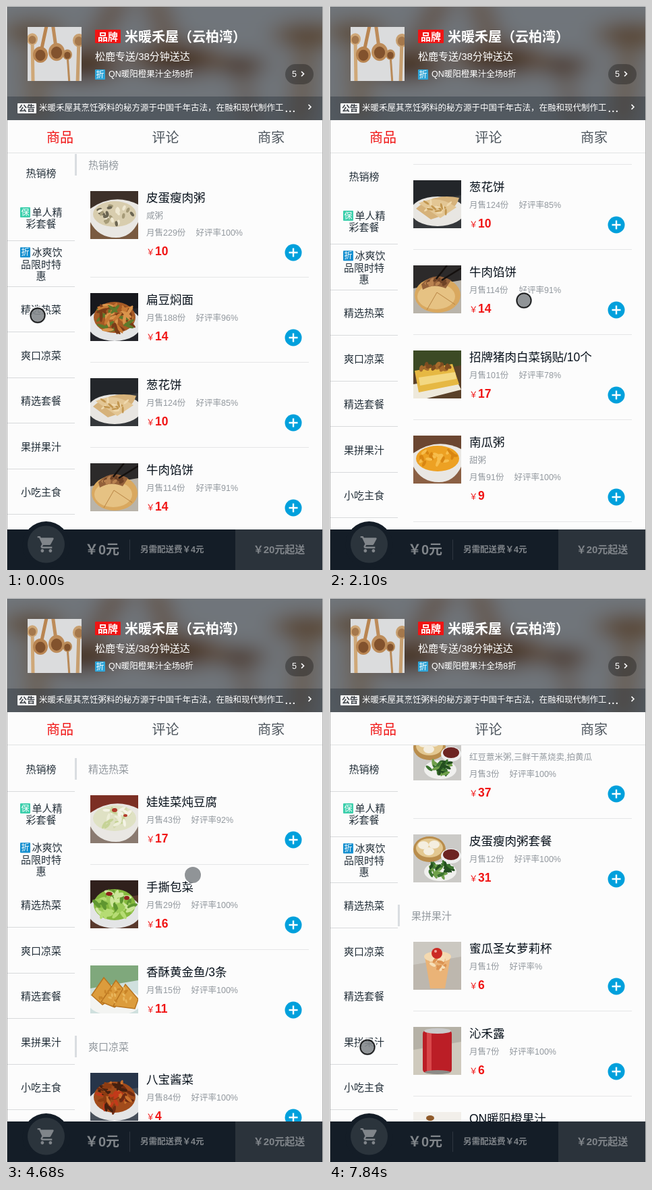
These frames come from a looping animation (470x835 px, 7990 ms). An HTML page:

```html
<!DOCTYPE html>
<html lang="zh">
<head>
<meta charset="utf-8">
<style>
html, body { margin: 0; width: 100%; height: 100%; overflow: hidden; background: #fcfcfc; }
svg { display: block; }
text { font-family: "Liberation Sans", "Noto Sans CJK SC", "Noto Sans CJK", sans-serif; white-space: pre; }
</style>
</head>
<body>
<svg id="stage" width="470" height="835" viewBox="0 0 470 835"></svg>
<script>
const RED = '#f01414', GREY = '#93999f', INK = '#07111b', DIM = '#80858a';

const text = (x, y, size, fill, str, more = '') =>
  `<text x="${x}" y="${y}" font-size="${size}" fill="${fill}" ${more}>${str}</text>`;
const rect = (x, y, w, h, fill, more = '') =>
  `<rect x="${x}" y="${y}" width="${w}" height="${h}" fill="${fill}" ${more}/>`;
const oval = (x, y, rx, ry, fill, more = '') =>
  `<ellipse cx="${x}" cy="${y}" rx="${rx}" ry="${ry}" fill="${fill}" ${more}/>`;
const path = (d, fill, more = '') => `<path d="${d}" fill="${fill}" ${more}/>`;
const BOLD = 'font-weight="700"', MID = 'text-anchor="middle"';

// ---- food pictures, 71 x 71 ----
let seed = 7;
const rnd = () => (seed = seed * 16807 % 2147483647) / 2147483647;

function bits(cx, cy, rx, ry, colors, n, len = 6, thick = 2.2) {
  let s = '';
  for (let i = 0; i < n; i++) {
    const a = rnd() * 6.28, r = Math.sqrt(rnd());
    const x = cx + Math.cos(a) * r * rx, y = cy + Math.sin(a) * r * ry;
    s += oval(x.toFixed(1), y.toFixed(1), len, thick, colors[i % colors.length],
      `transform="rotate(${rnd() * 180 | 0} ${x.toFixed(1)} ${y.toFixed(1)})"`);
  }
  return s;
}
const ground = (back, table) => rect(0, 0, 71, 71, back) + path('M0 34L71 22V71H0z', table);
const bowl = (food, colors, n = 24, len = 4) =>
  path('M0 26Q35 2 71 20V46Q60 69 38 69Q12 69 0 46z', '#e9e7e3') +
  oval(36, 34, 32, 19, food) + bits(36, 34, 27, 15, colors, n, len);
const heap = (food, colors, n = 40, len = 7, thick = 2.4) =>
  oval(36, 46, 40, 25, '#e4e5e6') + oval(36, 36, 31, 23, food) + bits(36, 36, 27, 20, colors, n, len, thick);

const art = {
  congee: () => ground('#3d3029', '#7a5a40') + bowl('#d8cdae', ['#6b6552', '#efe8d2', '#a69b78']),
  noodle: () => ground('#17181d', '#24252b') +
    heap('#a65a25', ['#c87a35', '#7a3c18', '#5d7a2c', '#d9944c'], 46, 9),
  pancake: () => ground('#23262a', '#35383b') + oval(36, 46, 40, 22, '#e8e6e2') +
    path('M4 42Q30 18 68 26Q62 48 26 58z', '#d6b27a') + path('M8 34Q36 20 64 40L40 56z', '#e3c694') +
    bits(36, 39, 22, 10, ['#c2964f', '#efd9ae'], 16, 5, 1.5),
  pie: () => ground('#2c2a2a', '#b9b4aa') + oval(36, 44, 34, 26, '#d9a85f') + oval(34, 46, 28, 19, '#e6c283') +
    path('M12 28Q30 8 56 22L48 34Q30 26 14 36z', '#94613a') + bits(34, 25, 16, 4, ['#b98250', '#6e4226'], 12, 4) +
    path('M50 0L34 20M71 4L42 22', 'none', 'stroke="#14100e" stroke-width="2.5"') +
    path('M35 40L20 66M35 40L62 58', 'none', 'stroke="#b98544"'),
  dumpling: () => ground('#3c4a25', '#5a4129') + path('M0 50L62 40L71 58L20 71H0z', '#eee9db') +
    path('M2 30L58 20L68 50L8 62z', '#e6b843') + path('M8 40L62 32L64 42L10 52z', '#f3d883') +
    bits(33, 25, 24, 5, ['#7d4c20', '#a66b2c'], 16, 5, 3),
  pumpkin: () => ground('#6b4631', '#8b6044') + bowl('#eda123', ['#f7bd4c', '#d98612'], 22, 5),
  redbean: () => ground('#584034', '#82604a') + bowl('#8f4a3c', ['#6b2c25', '#c8a58a'], 24, 3),
  pickle: () => ground('#27354a', '#48505b') + heap('#a14b1b', ['#c9702c', '#6e2b12', '#c23a1a', '#8d3c12', '#45200f'], 50, 7),
  fan: () => ground('#2a2a2e', '#44413d') + oval(36, 48, 42, 26, '#dfe0df') +
    path('M2 24Q24 6 56 16L38 50L4 46z', '#d3c682') + path('M16 54L40 18Q72 34 66 58Q40 70 16 54z', '#ddd196') +
    bits(38, 38, 22, 16, ['#b9ad57', '#efe6b8'], 24, 3, 1.4) + oval(66, 48, 4, 3, '#cf3a26'),
  set: () => rect(0, 0, 71, 71, '#d2d0cc') + oval(22, 20, 24, 19, '#c8a052') + oval(22, 18, 19, 14, '#ecd9a2') +
    [[14, 14], [30, 13], [22, 23]].map(p => oval(...p, 8, 6, '#f4eee0')).join('') +
    oval(56, 24, 15, 11, '#f0eeea') + oval(56, 23, 11, 8, '#b96b32') +
    oval(58, 51, 15, 11, '#f0eeea') + oval(58, 50, 11, 8, '#a5552a') +
    oval(24, 53, 25, 16, '#eef0ea') + bits(24, 51, 18, 11, ['#a8cc6a', '#d3e3a3', '#c3dc8c'], 30, 6),
  set2: () => rect(0, 0, 71, 71, '#cbcac7') + oval(24, 22, 24, 19, '#b98d4c') + oval(24, 20, 20, 14, '#e3c891') +
    [[15, 16], [31, 15], [23, 25]].map(p => oval(...p, 8, 6, '#f4eee0')).join('') +
    oval(56, 32, 15, 11, '#eee') + oval(56, 30, 12, 8, '#6d2422') +
    oval(40, 55, 24, 14, '#f0f0ee') + bits(40, 52, 18, 10, ['#3c7430', '#6fa04a', '#244f20'], 30, 6),
  tofu: () => ground('#7c2f24', '#8a7a70') + bowl('#dfe1c4', ['#f4f3e6', '#c6d396', '#edeed8', '#d5dab0'], 26, 6) +
    oval(36, 22, 4, 3, '#b23a2a') + oval(52, 30, 3, 2, '#b23a2a'),
  cabbage: () => ground('#30201c', '#59392c') +
    heap('#86b93e', ['#b6dc74', '#5f9630', '#cde69a', '#9ccb58'], 40, 8, 3) +
    oval(28, 20, 5, 3, '#8f231c') + oval(54, 26, 4, 3, '#8f231c'),
  fish: () => ground('#7fa87c', '#cfe0de') + oval(36, 54, 40, 20, '#f3f4f2') +
    ['M2 44L20 18L42 44L18 58z', 'M16 54L38 22L58 46L36 62z', 'M34 60L52 28L71 50L66 64z']
      .map(d => path(d, '#dc9c3c', 'stroke="#b8741f" stroke-width="1.5"')).join('') +
    bits(38, 44, 26, 12, ['#e9b65c', '#c98428'], 20, 3, 1.5),
  cucumber: () => ground('#1c2420', '#2c302a') + heap('#4e7a2b', ['#86b04c', '#2f5a1e', '#a9c873', '#416c26'], 30, 10, 3.6),
  cup: () => ground('#cbc8c1', '#bdb7ae') + path('M17 22H55L47 69H25z', '#eab377') +
    oval(36, 22, 20, 8, '#f4d9b0') + bits(36, 32, 14, 9, ['#f6dfb8', '#dc9352'], 14, 5) +
    oval(35, 17, 8, 8, '#cb2a24') + oval(33, 14, 2, 2, '#f0a89c'),
  can: () => ground('#b5b1a6', '#cfcabd') + rect(14, 5, 43, 63, '#bb1e26', 'rx="5"') +
    rect(20, 8, 7, 58, '#d8474a') + oval(36, 6, 20, 4, '#c9c9c9') + oval(36, 67, 19, 3, '#8c8a86'),
  juice: () => rect(0, 0, 71, 71, '#f2efea') + path('M18 24H52L48 71H22z', '#eea53a') + oval(25, 9, 6, 4, '#8f5a2a')
};

// ---- menu data: [section, [name, sold, rating, price, picture, ...description lines]] ----
const juice = ['QN暖阳橙果汁', 15, 100, 8, 'juice'];
const pickles = ['八宝酱菜', 84, 100, 4, 'pickle'];
const sections = [
  ['热销榜', [
    ['皮蛋瘦肉粥', 229, 100, 10, 'congee', '咸粥'],
    ['扁豆焖面', 188, 96, 14, 'noodle'],
    ['葱花饼', 124, 85, 10, 'pancake'],
    ['牛肉馅饼', 114, 91, 14, 'pie'],
    ['招牌猪肉白菜锅贴/10个', 101, 78, 17, 'dumpling'],
    ['南瓜粥', 91, 100, 9, 'pumpkin', '甜粥'],
    ['红豆薏米美容粥', 86, 100, 12, 'redbean', '甜粥'],
    pickles,
    ['红枣山药糙米粥', 81, 91, 10, 'pickle'],
    ['糊塌子', 80, 93, 10, 'fan']]],
  ['单人精彩套餐', [
    ['红枣山药粥套餐', 17, 100, 29, 'set', '红枣山药糙米粥,素材包,爽口莴笋丝,四川泡', '菜或八宝酱菜,配菜可备注']]],
  ['冰爽饮品限时特惠', [juice]],
  ['精选热菜', [
    ['娃娃菜炖豆腐', 43, 92, 17, 'tofu'],
    ['手撕包菜', 29, 100, 16, 'cabbage'],
    ['香酥黄金鱼/3条', 15, 100, 11, 'fish']]],
  ['爽口凉菜', [pickles, ['拍黄瓜', 28, 100, 9, 'cucumber']]],
  ['精选套餐', [
    ['红豆薏米粥套餐', 3, 100, 37, 'set2', '红豆薏米粥,三鲜干蒸烧卖,拍黄瓜'],
    ['皮蛋瘦肉粥套餐', 12, 100, 31, 'set2']]],
  ['果拼果汁', [
    ['蜜瓜圣女萝莉杯', 1, '', 6, 'cup'],
    ['沁禾露', 7, 100, 6, 'can'],
    juice]],
  ['小吃主食', []]
];

const TOP = 218.5, tops = [];

function foodItem([name, sold, rate, price, pic, ...desc], y, last) {
  const extra = desc.length ? 10 + 15 * desc.length : 0;
  const rateX = 208 + 52.5 + 7 * String(sold).length;
  return `<g transform="translate(0 ${Math.round(TOP + y)})">` +
    `<svg x="125" width="71" height="71">${art[pic]()}</svg>` +
    text(208, 16, 17.5, INK, name) +
    desc.map((d, i) => text(208, 41 + 15 * i, 12.5, GREY, d)).join('') +
    text(208, 41 + extra, 12.5, GREY, `月售${sold}份`) +
    text(rateX, 41 + extra, 12.5, GREY, `好评率${rate}%`) +
    text(208, 70 + extra, 12.5, RED, '￥') + text(221, 70 + extra, 17.5, RED, price, BOLD) +
    oval(426, 66 + extra, 12.5, 12.5, '#00a0dc') +
    path(`M419.5 ${66 + extra}h13m-6.5 -6.5v13`, 'none', 'stroke="#fff" stroke-width="2.4"') +
    (last ? '' : rect(125, 102 + extra, 324, 1, '#e5e6e7')) + '</g>';
}

function foodList() {
  let y = 0, s = '';
  for (const [title, foods] of sections) {
    tops.push(y);
    const ty = Math.round(TOP + y);
    if (foods.length) s += rect(102, ty, 3, 32, '#d9dde1') + text(122, ty + 22, 15, GREY, title);
    y += 55.5;
    foods.forEach((f, i) => {
      const last = i == foods.length - 1, lines = f.length - 5;
      s += foodItem(f, y, last);
      y += (last ? 103.5 : 126) + (lines ? 10 + 15 * lines : 0);
    });
  }
  return s;
}

const tag = (x, y, bg, ch) => rect(x, y, 15, 15, bg, 'rx="1"') + text(x + 7.5, y + 12, 12, '#fff', ch, MID);

function menuItem([title], i) {
  const lines = { 1: ['单人精', '彩套餐'], 2: ['冰爽饮', '品限时特', '惠'] }[i] || [title];
  const first = 5.5 - (lines.length - 1) * 8.6, tagged = lines.length > 1;
  return '<g class="item">' +
    (tagged ? tag(21, first - 13, i == 1 ? '#3ccfac' : '#1590d0', i == 1 ? '保' : '折') : '') +
    lines.map((l, k) => text(tagged && !k ? 61 : 52, first + 17.2 * k, 15, '#24303a', l, MID)).join('') +
    rect(2, 33, 100, 1, '#d8dadc') + '</g>';
}

// ---- fixed parts ----
// [bowl x, bowl y, bowl radius, handle end x, handle end y, wood]
const spoons = rect(0, 0, 80, 80, '#dbdcdd') +
  [[7, 18, 8, 8, 80, '#cfa878'], [19, 41, 11, 29, -6, '#b98551'], [43, 37, 12, 37, -6, '#bd8c5a'],
    [59, 41, 7, 62, 84, '#b98a58'], [76, 20, 9, 74, 84, '#c79f70']]
    .map(([x, y, r, hx, hy, wood], i) =>
      path(`M${x} ${y}L${hx} ${hy}`, 'none', `stroke="${wood}" stroke-width="${i == 3 ? 3 : 5}"`) +
      oval(x, y, r, r * 1.1, wood) + oval(x, y + 1, r * .68, r * .75, i % 4 ? '#82522d' : '#a5784c')).join('');
const arrow = (x, y) => path(`M${x} ${y - 3.5}l3.5 3.5l-3.5 3.5`, 'none', 'stroke="#fff" stroke-width="1.6"');

const header =
  `<defs><g id="spoons">${spoons}</g><filter id="blur"><feGaussianBlur stdDeviation="17 14"/></filter></defs>` +
  '<svg width="470" height="169">' + rect(0, 0, 470, 169, '#dbdcdd') +
  '<g filter="url(#blur)"><use href="#spoons" transform="scale(5.875 2.12)"/></g>' +
  rect(0, 0, 470, 169, INK, 'opacity=".5"') + rect(0, 134, 470, 35, INK, 'opacity=".28"') + '</svg>' +
  '<svg x="32" y="31" width="80" height="80"><use href="#spoons"/></svg>' +
  rect(132, 35, 38, 20, RED, 'rx="1"') + text(151, 50.5, 15, '#fff', '品牌', BOLD + ' ' + MID) +
  text(176, 53, 20, '#fff', '米暖禾屋（云柏湾）', BOLD) +
  text(132, 80, 15, '#fff', '松鹿专送/38分钟送达') +
  tag(132, 94, '#2fa5d8', '折') + text(152, 105, 12.5, '#fff', 'QN暖阳橙果汁全场8折') +
  rect(414, 86, 42, 30, '#000', 'rx="15" opacity=".3"') + text(424, 105, 12.5, '#fff', '5') + arrow(438, 100.5) +
  rect(17, 144, 28, 15, '#f4f4f4', 'rx="1"') + text(31, 156, 12, '#3a3f45', '公告', BOLD + ' ' + MID) +
  text(49, 155, 12.5, '#fff', '米暖禾屋其烹饪粥料的秘方源于中国千年古法，在融和现代制作工') +
  text(413, 157, 20, '#fff', '...') + arrow(448.5, 149.5) +
  rect(0, 169, 470, 49, '#fcfcfc') + rect(0, 217, 470, 1, '#e2e3e4') +
  ['商品', '评论', '商家'].map((t, i) => text(80 + 156.5 * i, 201.5, 20, i ? '#4d555d' : RED, t, MID)).join('');

const cart = 'M7 18c-1.1 0-2 .9-2 2s.9 2 2 2 2-.9 2-2-.9-2-2-2zM1 2v2h2l3.6 7.6-1.35 2.4c-.16.3-.25.6-.25 1 0 1.1.9 2 2 2h12v-2H7.4' +
  'l-.2-.4.9-1.6h7.45c.75 0 1.4-.4 1.75-1l3.6-6.5c.3-.7-.2-1.5-.9-1.5H5.2l-.9-2zM17 18c-1.1 0-2 .9-2 2s.9 2 2 2 2-.9 2-2-.9-2-2-2z';
const footer = rect(0, 775, 470, 60, '#141d27') + oval(59.5, 798, 35, 35, '#141d27') +
  oval(59.5, 797, 27.5, 27.5, '#2b343c') + path(cart, DIM, 'transform="translate(45.5 782.5) scale(1.2)"') +
  text(117, 812, 20, DIM, '￥0元', BOLD) + rect(183, 790, 1, 30, '#2f3740') +
  text(199, 809, 12.5, DIM, '另需配送费￥4元', BOLD) +
  rect(340, 775, 130, 60, '#2b333b') + text(405, 810, 15, DIM, '￥20元起送', BOLD + ' ' + MID);

const edges = rect(0, 0, 1, 835, '#f4f4f4') + rect(1, 0, 1, 835, '#a8a8a8') +
  rect(469, 0, 1, 835, '#b4b4b4') + rect(0, 0, 470, 1, '#d0d0d0');

const pointer = '<g id="pointer">' + oval(0, 0, 13, 13, 'none', 'stroke="#fff" stroke-width="1.5"') +
  oval(0, 0, 12, 12, '#84888c', 'opacity=".9"') +
  oval(0, 0, 10.5, 10.5, 'none', 'id="press" stroke="#111" stroke-width="1.5"') + '</g>';

const $ = id => document.getElementById(id);
$('stage').innerHTML = rect(0, 0, 470, 835, '#fcfcfc') + `<g id="list">${foodList()}</g>` +
  `<g id="menu">${sections.map(menuItem).join('')}</g>` + header + footer + edges + pointer;
const items = [...document.querySelectorAll('.item')];

// ---- motion ----
const LOOP = 7990;
// [time, list scroll, pointer x, pointer y]
const keys = [
  [0, 0, 47, 458], [150, 0, 47, 458], [640, 0, 272, 556], [1110, 67, 278, 490], [1300, 67, 278, 490],
  [1500, 157, 284, 395], [1750, 245, 286, 400], [2090, 293, 289, 436], [2250, 293, 289, 436],
  [2500, 420, 286, 310], [2900, 690, 282, 390], [3330, 830, 280, 480], [3480, 854, 280, 480],
  [3720, 959, 279, 376], [3870, 959, 279, 376], [4100, 1330, 278, 290], [4450, 1640, 276, 460],
  [4650, 1708, 277, 410], [4800, 1708, 277, 410], [5000, 1800, 277, 330], [5500, 1910, 96, 632],
  [5950, 1910, 54, 600], [6420, 1910, 54, 600], [6850, 2422, 54, 600], [7450, 2422, 57, 665],
  [7580, 2422, 57, 665], [7820, 2497, 57, 665], [LOOP, 2497, 57, 665]
];
// bursts of evenly spaced picture changes: [first, last, count]
const bursts = [[150, 1140, 8], [1300, 2250, 8], [2370, 3330, 8], [3480, 4380, 8],
  [4530, 5550, 9], [5670, 6030, 4], [6420, 7460, 9], [7580, 7840, 3]];

function snap(t) {
  const b = bursts.filter(b => b[0] <= t).pop();
  if (!b) return 0;
  const step = (b[1] - b[0]) / (b[2] - 1);
  return b[0] + step * Math.min(b[2] - 1, Math.floor((t - b[0] + 20) / step));
}

function pose(t) {
  const i = keys.findIndex(k => k[0] > t), a = keys[i - 1], b = keys[i];
  const p = (t - a[0]) / (b[0] - a[0]);
  return a.map((v, k) => v + (b[k] - v) * p);
}

function draw(now) {
  const t = snap(now % LOOP), [, scroll, x, y] = pose(t);
  const current = tops.filter(top => top <= scroll).length - 1;
  const drift = -5 * Math.max(0, 1 - Math.max(0, t - 100) / 300);
  $('list').setAttribute('transform', `translate(0 ${-Math.round(scroll)})`);
  items.forEach((item, i) => {
    const cy = Math.round(252.5 + 67.5 * i - (i >= current) + drift);
    item.setAttribute('transform', `translate(0 ${cy})`);
    item.lastChild.style.display = i == current || i == current - 1 ? 'none' : '';
  });
  $('pointer').setAttribute('transform', `translate(${x} ${y})`);
  const pressed = t < 150 || t > 2050 && t < 2500 || t > 7560;
  $('press').style.display = pressed ? '' : 'none';
  requestAnimationFrame(draw);
}
requestAnimationFrame(draw);
</script>
</body>
</html>
```
